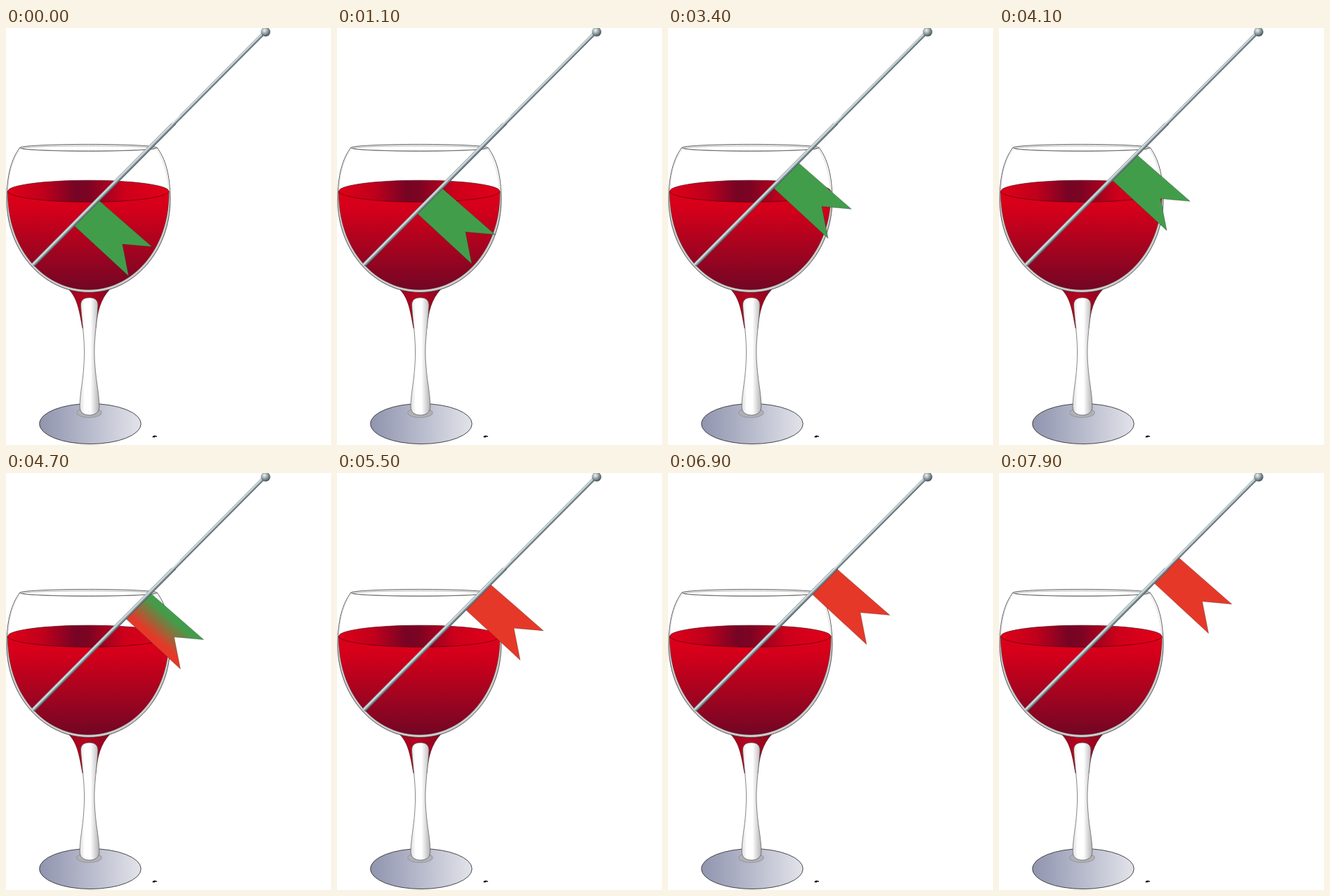
Recreate the animation shown at these times as an HTML page. Size 467 px wide and 600 px high, loop 8 s.

```html
<!DOCTYPE html>
<html lang="en">
<head>
<meta charset="utf-8">
<title>Wine glass and flag</title>
<style>
html, body { margin: 0; width: 100%; height: 100%; overflow: hidden; background: #fff; }
svg { display: block; width: 467px; height: 600px; }
</style>
</head>
<body>
<svg viewBox="0 0 467 600">
  <defs>
    <linearGradient id="wine" x1="0" y1="0" x2="0" y2="1">
      <stop offset="0" stop-color="#e00018"/>
      <stop offset=".2" stop-color="#d2001b"/>
      <stop offset=".6" stop-color="#a20420"/>
      <stop offset="1" stop-color="#720624"/>
    </linearGradient>
    <linearGradient id="surface">
      <stop offset="0" stop-color="#e00018"/>
      <stop offset=".22" stop-color="#c0001c"/>
      <stop offset=".42" stop-color="#760424"/>
      <stop offset=".5" stop-color="#7c0423"/>
      <stop offset=".72" stop-color="#cc001b"/>
      <stop offset="1" stop-color="#e40018"/>
    </linearGradient>
    <linearGradient id="neck">
      <stop offset="0" stop-color="#9a0420"/>
      <stop offset=".4" stop-color="#b8041f"/>
      <stop offset="1" stop-color="#8c0420"/>
    </linearGradient>
    <linearGradient id="stem">
      <stop offset="0" stop-color="#dcdcde"/>
      <stop offset=".25" stop-color="#fff"/>
      <stop offset=".55" stop-color="#fff"/>
      <stop offset="1" stop-color="#b2b2b6"/>
    </linearGradient>
    <linearGradient id="foot">
      <stop offset="0" stop-color="#9094ae"/>
      <stop offset=".5" stop-color="#b8bbcc"/>
      <stop offset="1" stop-color="#e2e3ea"/>
    </linearGradient>
    <linearGradient id="rod" x1="0" y1="0" x2="0" y2="1">
      <stop offset="0" stop-color="#8d9ca0"/>
      <stop offset=".3" stop-color="#dfe8ea"/>
      <stop offset=".6" stop-color="#8f9fa3"/>
      <stop offset="1" stop-color="#42525a"/>
    </linearGradient>
    <radialGradient id="ball" cx=".38" cy=".35" r=".7">
      <stop offset="0" stop-color="#eef3f4"/>
      <stop offset=".45" stop-color="#9aa8ac"/>
      <stop offset="1" stop-color="#3a484d"/>
    </radialGradient>
    <linearGradient id="dye" gradientUnits="userSpaceOnUse" x1="98" y1="284" x2="131.5" y2="245.9">
      <stop offset=".12" stop-color="#e63828"/>
      <stop offset=".85" stop-color="#429d4b"/>
    </linearGradient>
  </defs>

  <!-- foot -->
  <ellipse cx="121" cy="569.500" rx="73" ry="29" fill="url(#foot)" stroke="#333" stroke-width=".9"/>
  <ellipse cx="119.500" cy="553.500" rx="18" ry="7" fill="#b0b0b6" stroke="#777" stroke-width=".5"/>

  <!-- neck and stem -->
  <path d="M90 376C102 388 105 404 110 432H129C131 408 136 390 149 376Z" fill="url(#neck)" stroke="#400" stroke-width=".6"/>
  <path d="M120 388C111 388 107 392 107.500 400C109 422 113 446 112.500 470C112 505 106 524 106 545C106 553 112 557 120 557C128 557 134 553 134 545C134 524 128 505 127 470C126.500 446 131 422 132 400C132.500 392 128 388 120 388Z" fill="url(#stem)" stroke="#555" stroke-width=".7"/>

  <!-- bowl -->
  <path d="M1 235V247C1 321 54 380.500 119 380.500C183 380.500 236 321 236 247V235Z" fill="#cbcbcd"/>
  <path d="M2.500 235C2 318 54 376.500 118.500 376.500C182 376.500 235 318 234 235Z" fill="url(#wine)" stroke="#500" stroke-width=".5"/>
  <ellipse cx="118.300" cy="234.800" rx="115.700" ry="15.600" fill="url(#surface)" stroke="#500010" stroke-width=".7"/>
  <g fill="none" stroke="#333" stroke-width=".8">
    <path d="M20 172C8 188 1 212 1 247C1 321 54 380.500 119 380.500C183 380.500 236 321 236 247C236 212 229 188 217 172"/>
    <path d="M3 232C4 206 11 186 21 174M233.500 232C231 206 225 186 216 174" stroke="#bbb" stroke-width=".5"/>
    <ellipse cx="118.500" cy="172.300" rx="98.500" ry="4.900"/>
    <ellipse cx="118.500" cy="173.200" rx="96" ry="3.600" stroke="#777" stroke-width=".6"/>
  </g>

  <path id="flag" d="M134 248.500L209.800 314.800L167.300 311L176.300 357L98 284.500Z" fill="url(#dye)" stroke="#222" stroke-opacity=".5" stroke-width=".6"/>

  <!-- stirring rod -->
  <g transform="translate(38.500 341.500) rotate(-45.200)">
    <rect x="0" y="-3" width="290" height="6" rx="2" fill="url(#rod)"/>
    <rect x="286" y="-2.500" width="184" height="5" fill="url(#rod)"/>
    <path d="M286 -2.400H302" stroke="#fff" stroke-width="1"/>
  </g>
  <circle cx="373" cy="5.500" r="6.800" fill="url(#ball)"/>

  <path d="M210 588.500L212 586.500H214.500L217 587.200V588.300L214.500 588.200L213 589.200Z" fill="#000"/>
</svg>
<script>
const LOOP = 8000, TICK = 100;
const STEP = { x: 1.58, y: -1.597 };        // pixels per tick
const DYE_START = 4100, DYE_END = 5300;
const flag = document.getElementById("flag");
const dye = document.getElementById("dye");
const begin = performance.now();

function draw(now) {
  const time = Math.max(0, now - begin) % LOOP;
  const tick = Math.floor(time / TICK);
  flag.setAttribute("transform", `translate(${tick * STEP.x} ${tick * STEP.y})`);

  // The red edge sweeps from the lower side of the flag to the upper one.
  const p = (tick * TICK - DYE_START) / (DYE_END - DYE_START);
  const k = Math.min(1, Math.max(0, p)) * 2 - 1;
  dye.setAttribute("gradientTransform", `translate(${k * 33.5} ${k * -38.1})`);
  requestAnimationFrame(draw);
}
draw(begin);
</script>
</body>
</html>
```
